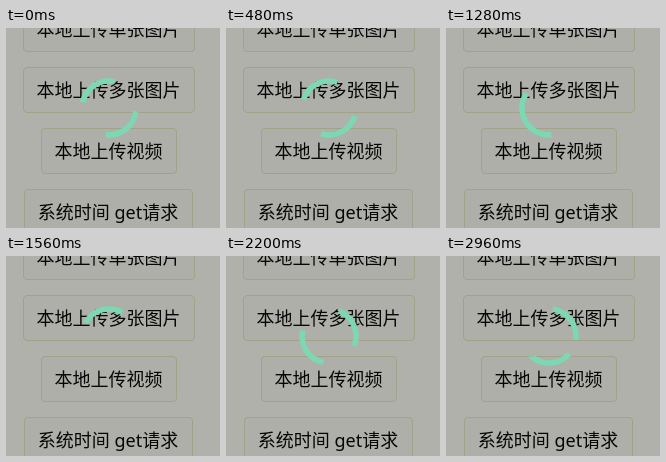
An HTML page with a canvas for the animation above (3000 ms loop, 214x200 px).

```html
<!DOCTYPE html>
<html lang="zh">
<head>
<meta charset="utf-8">
<style>
  html, body { margin: 0; width: 100%; height: 100%; overflow: hidden; background: #b1b1ac; }
  #stage { position: absolute; left: 0; top: 0; width: 214px; height: 200px; overflow: hidden; }
  .btn {
    position: absolute; box-sizing: border-box; height: 46px;
    border: 1px solid #a2a288; border-radius: 4px; background: #afafaa;
    color: #060606; font: 18px/44px "Noto Sans", "Noto Sans CJK SC", "Noto Sans CJK", sans-serif;
    text-align: center; white-space: nowrap;
  }
  .btn span { position: relative; left: -0.5px; }
  canvas { position: absolute; left: 0; top: 0; }
</style>
</head>
<body>
<div id="stage">
  <div class="btn" style="left:17px;top:-22px;width:172px"><span>本地上传单张图片</span></div>
  <div class="btn" style="left:17px;top:39px;width:172px"><span>本地上传多张图片</span></div>
  <div class="btn" style="left:35px;top:100px;width:136px"><span>本地上传视频</span></div>
  <div class="btn" style="left:18px;top:161px;width:169px"><span>系统时间 get请求</span></div>
  <canvas id="ring" width="214" height="200"></canvas>
</div>
<script>
  const ctx = document.getElementById('ring').getContext('2d');
  const LOOP = 3000, STEP = 40;
  const CX = 103, CY = 80, R = 27;

  // [time, turn of first arc, turn of second arc] in ms and degrees
  const keys = [
    [0, 142, 327],
    [480, 152, 333],
    [1000, 170, 455],
    [1560, 345, 705],
    [1960, 413, 954],
    [2200, 426, 957],
    [2960, 536, 1133]
  ];

  function turns(t) {
    let i = 0;
    while (i < keys.length - 2 && t >= keys[i + 1][0]) i++;
    const a = keys[i], b = keys[i + 1];
    const k = (t - a[0]) / (b[0] - a[0]);
    return [1, 2].map(n => a[n] + (b[n] - a[n]) * k);
  }

  function draw(now) {
    const t = Math.floor((now % LOOP) / STEP) * STEP;
    ctx.clearRect(0, 0, 214, 200);
    ctx.strokeStyle = '#7cd8b2';
    ctx.lineWidth = 5.5;
    ctx.beginPath();
    for (const turn of turns(t)) {
      const mid = (turn - 90) * Math.PI / 180;
      const from = mid - Math.PI / 4;
      ctx.moveTo(CX + R * Math.cos(from), CY + R * Math.sin(from));
      ctx.arc(CX, CY, R, from, mid + Math.PI / 4);
    }
    ctx.stroke();
  }

  let start = null;
  function tick(now) {
    if (start === null) start = now;
    draw(now - start);
    requestAnimationFrame(tick);
  }
  draw(0);
  requestAnimationFrame(tick);
</script>
</body>
</html>
```
